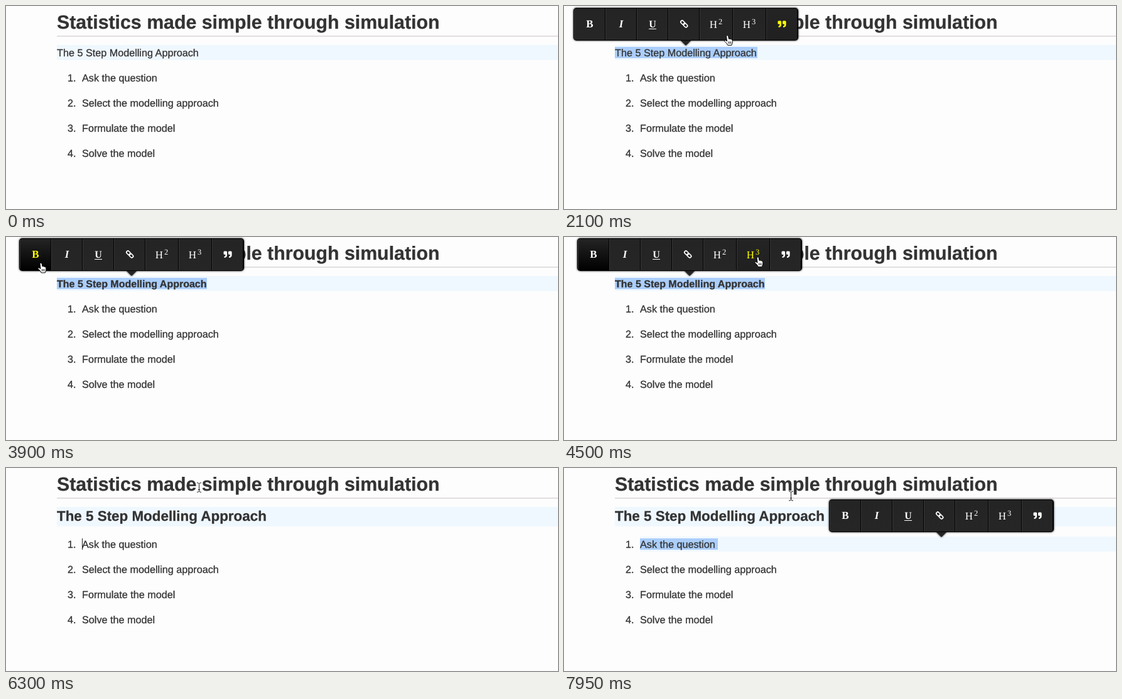
Recreate the animation shown at these times as an HTML page. Size 879 by 323 pixels, loop 8000 ms.

```html
<!DOCTYPE html>
<html lang="en">
<head>
<meta charset="utf-8">
<title>Text editor toolbar</title>
<style>
  html, body { margin: 0; width: 100%; height: 100%; overflow: hidden; background: #fdfdfd; }
  svg { display: block; }
  text {
    font-family: "Liberation Sans", Arial, sans-serif; font-size: 16.2px;
    fill: #333; stroke: #333; stroke-width: .3px; text-rendering: geometricPrecision;
  }
  .bold { font-weight: bold; }
  #toolbar text { font-family: "Liberation Serif", Times, serif; font-size: 17px; fill: inherit; stroke: none; text-anchor: middle; }
  #toolbar .sup { font-size: 12.5px; }
  #frame { filter: drop-shadow(0 0 1.5px #000); }
</style>
</head>
<body>
<svg id="stage" width="879" height="323" viewBox="0 0 879 323">
  <defs>
    <linearGradient id="plain" x2="0" y2="1">
      <stop stop-color="#242424"/><stop offset="1" stop-color="#262626"/>
    </linearGradient>
    <linearGradient id="hover" x2="0" y2="1">
      <stop stop-color="#242424"/><stop offset="1" stop-color="#202020"/>
    </linearGradient>
    <linearGradient id="active" x2="0" y2="1">
      <stop stop-color="#242424"/><stop offset="1" stop-color="#000"/>
    </linearGradient>
    <clipPath id="rounded"><rect x="1" y="1" width="356" height="50" rx="4"/></clipPath>
    <path id="quoteMark" d="M1.5 0H4Q5.6 0 5.6 1.6V6Q5.6 10.4 1 10.6V8.6Q3 8.4 3 6V5.6H1.5Q0 5.6 0 4V1.5Q0 0 1.5 0Z"/>
    <path id="beamShape" d="M-3.5-7.5Q0-7.5 0-5.5Q0-7.5 3.5-7.5M0-5.5V5.5M-3.5 7.5Q0 7.5 0 5.5Q0 7.5 3.5 7.5M-1.5 3.5h3"/>
  </defs>
  <rect width="879" height="323" fill="#fdfdfd"/>
  <rect x="81" y="47" width="798" height="2" fill="#e2dede"/>
  <text class="bold" x="81" y="36" style="font-size:30.3px">Statistics made simple through simulation</text>
  <rect id="headBand" x="81" y="62" width="798" fill="#f0f8ff"/>
  <rect id="itemBand" x="121" y="109" width="758" height="24" fill="#f0f8ff"/>
  <rect id="selection" fill="#abcefb"/>
  <text id="heading" x="81">The 5 Step Modelling Approach</text>
  <g id="list"></g>
  <rect id="caret" width="1" height="18" fill="#222"/>
  <g id="toolbar">
    <g id="frame">
      <rect width="358" height="52" rx="5" fill="#000"/>
      <path d="M171 52h16l-8 8z" fill="#242424"/>
    </g>
    <g id="buttons" clip-path="url(#rounded)"></g>
  </g>
  <g id="hand" fill="#fff" stroke="#000" stroke-linejoin="round">
    <path d="M4 2Q4.6 .5 6 .8Q7 1 7.2 2.4L8 6.4Q9.8 5.4 10.4 6.8Q12 6 12.6 7.6Q13.8 7.4 13.8 9.4V12L12.4 16.4H6.2L4.4 13.2L.9 10Q.4 7.8 2.8 8.5L5 10Z"/>
    <path d="M7.4 10.5v3.5M9.3 10.5v3.5M11.2 10.5v3.5" stroke-width=".8"/>
  </g>
  <g id="beam" fill="none">
    <use href="#beamShape" stroke="#fff" stroke-width="2.6"/>
    <use href="#beamShape" stroke="#222"/>
  </g>
</svg>
<script>
const LOOP = 8000;
const el = id => document.getElementById(id);

const set = (node, attrs) => {
  for (const key in attrs) node.setAttribute(key, attrs[key]);
};
const show = (node, visible) => set(node, { visibility: visible ? 'visible' : 'hidden' });
const moveTo = (node, [x, y]) => set(node, { transform: `translate(${x} ${y})` });

const items = ['Ask the question', 'Select the modelling approach', 'Formulate the model', 'Solve the model'];
el('list').innerHTML = items.map((item, i) => {
  const y = 120 + 40 * i;
  return `<text x="98" y="${y}">${i + 1}.</text><text x="121" y="${y}">${item}</text>`;
}).join('');

const letter = (char, style) => `<text x="25" y="31" style="${style}">${char}</text>`;
const level = n => `<text x="22" y="32">H</text><text class="sup" x="33" y="26">${n}</text>`;
const chainLink = x => `<rect x="${x - 3.6}" y="-2.3" width="7.2" height="4.6" rx="2.2"/>`;

const buttons = [
  ['bold', 50, letter('B', 'font-weight:bold')],
  ['italic', 50, letter('I', 'font-weight:bold;font-style:italic')],
  ['underline', 50, letter('U', 'font-size:16px;font-weight:bold') + '<rect x="19" y="33" width="12" height="1"/>'],
  ['link', 50, `<g transform="translate(25.2 25.5) rotate(45)" style="fill:none;stroke:#fff;stroke-width:1.7">${chainLink(-3)}${chainLink(3)}</g>`],
  ['h2', 53, level(2)],
  ['h3', 53, level(3)],
  ['quote', 50, '<use href="#quoteMark" x="18.5" y="20.5"/><use href="#quoteMark" x="26" y="20.5"/>']
];

let left = 1;
el('buttons').innerHTML = buttons.map(([name, width, icon]) => {
  const markup = `<g id="${name}" transform="translate(${left} 0)">
    <rect class="back" y="1" width="${width}" height="50"/>
    <rect y="1" width="1" height="50" fill="#383838"/>
    <rect x="${width - 1}" y="1" width="1" height="50" fill="#000"/>
    <g class="icon">${icon}</g></g>`;
  left += width;
  return markup;
}).join('');

// Each step overrides the state left by the previous ones.
const steps = [
  [0, { style: 'normal', selection: null, caret: null, bar: null, hover: '', active: [], hand: null, beam: null, itemBand: false }],
  [450, { caret: [308, 65] }],
  [1050, { caret: null, selection: [81, 65, 227, 18] }],
  [1350, { bar: [15, 2] }],
  [1500, { bar: [15, 3] }],
  [2100, { hover: 'quote', hand: [254.5, 46] }],
  [2250, { hover: '', hand: [121, 55] }],
  [2400, { hover: 'italic', hand: [83, 48.5] }],
  [2550, { hand: [55, 42.5] }],
  [2700, { hover: 'bold', hand: [40, 37] }],
  [2850, { hand: [39, 37.5] }],
  [3300, { style: 'bold', selection: [81, 65, 239, 18], bar: [21, 2], active: ['bold'] }],
  [3900, { hand: [50, 40.5] }],
  [4050, { hover: '', hand: [205, 57] }],
  [4200, { hover: 'h2', hand: [273, 44] }],
  [4350, { hover: 'h3', hand: [298, 33] }],
  [4500, { hand: [303, 31] }],
  [5100, { style: 'large', selection: [81, 62, 335, 28], bar: [69.5, 0], active: ['bold', 'h3'] }],
  [6300, { selection: null, bar: null, active: [], hand: null, beam: [307.5, 31], caret: [121, 112] }],
  [6450, { itemBand: true }],
  [6750, { caret: null }],
  [7200, { selection: [121, 112, 124, 18] }],
  [7350, { bar: [422, 49] }],
  [7500, { bar: [422, 50] }],
  [7950, { hover: '', beam: [361.5, 44.5] }]
];

const headings = {
  normal: { size: 16.2, weight: 'normal', y: 80, band: 24, shift: 0 },
  bold: { size: 16, weight: 'bold', y: 80, band: 24, shift: 0 },
  large: { size: 22.4, weight: 'bold', y: 84, band: 31, shift: 7 }
};

function place(id, position) {
  show(el(id), position);
  if (position) moveTo(el(id), position);
}

function render(time) {
  const state = Object.assign({}, ...steps.filter(([start]) => start <= time).map(step => step[1]));
  const heading = headings[state.style];

  el('heading').style.fontSize = heading.size + 'px';
  el('heading').style.fontWeight = heading.weight;
  set(el('heading'), { y: heading.y });
  set(el('headBand'), { height: heading.band });
  moveTo(el('list'), [0, heading.shift]);
  show(el('itemBand'), state.itemBand);

  show(el('selection'), state.selection);
  if (state.selection) {
    const [x, y, width, height] = state.selection;
    set(el('selection'), { x, y, width, height });
  }

  place('caret', state.caret);
  place('toolbar', state.bar);
  place('hand', state.hand);
  place('beam', state.beam);

  for (const [name] of buttons) {
    const hovered = state.hover === name;
    const fill = state.active.includes(name) ? 'active' : hovered ? 'hover' : 'plain';
    set(el(name).querySelector('.back'), { fill: `url(#${fill})` });
    set(el(name).querySelector('.icon'), { fill: hovered ? '#ff0' : '#fff' });
  }
}

const started = performance.now();
function tick() {
  render((performance.now() - started) % LOOP);
  requestAnimationFrame(tick);
}
tick();
</script>
</body>
</html>
```
